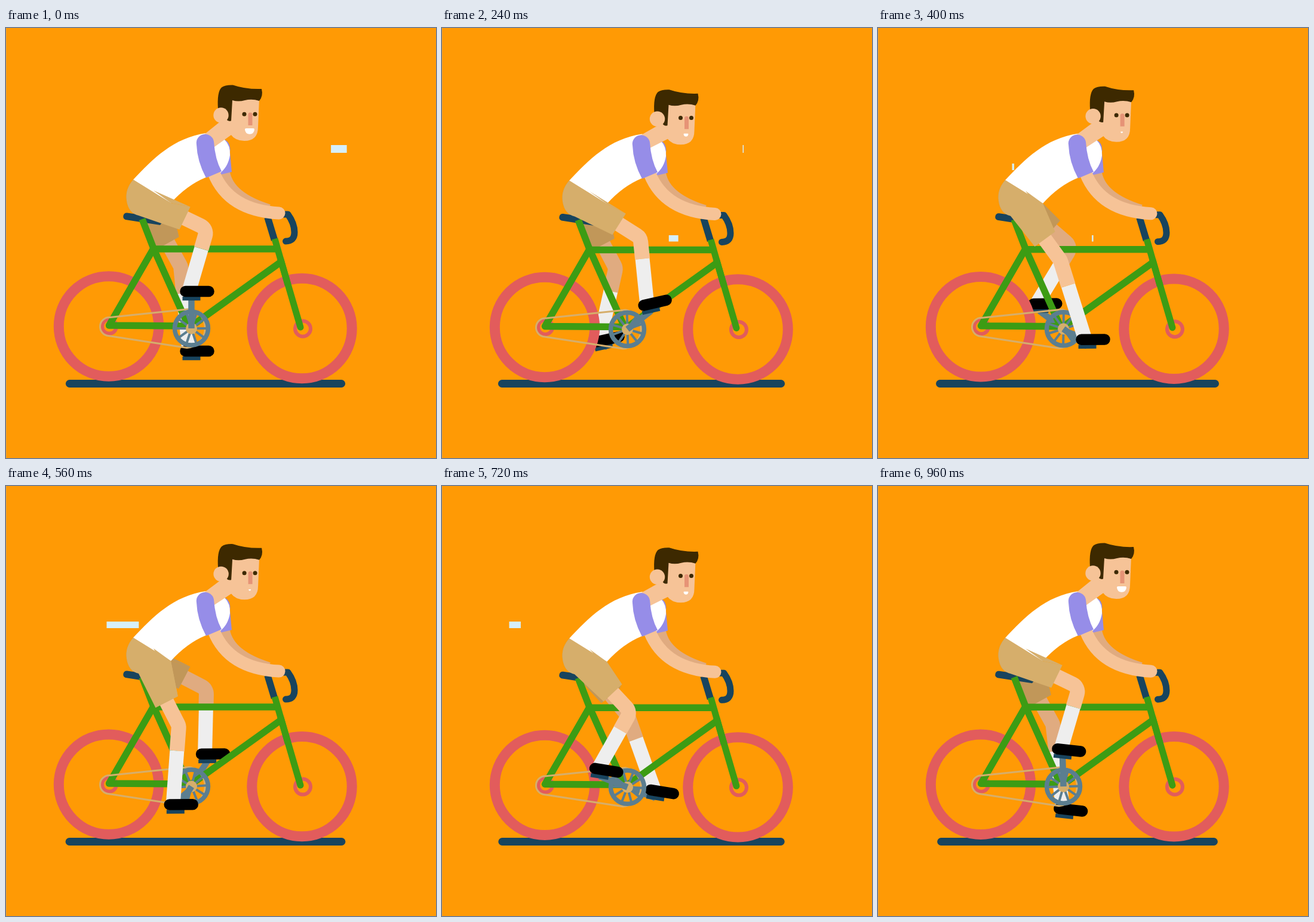
Recreate the animation shown at these times as an HTML page with a canvas. Size 720 by 720 pixels, loop 1000 ms.

```html
<!DOCTYPE html>
<html lang="en">
<head>
<meta charset="utf-8">
<title>Cyclist</title>
<style>
html, body { margin: 0; width: 100%; height: 100%; overflow: hidden; background: #ff9a05; }
canvas { display: block; width: 720px; height: 720px; }
</style>
</head>
<body>
<canvas id="stage" width="720" height="720"></canvas>
<script>
const g = document.getElementById('stage').getContext('2d');
const LOOP = 1000, STEP = 40, TAU = Math.PI * 2, RAD = Math.PI / 180;
const HUB = [310.5, 503], CRANK = 50, HIP = [230, 285];
const C = {
  bg: '#ff9a05', navy: '#18445e', red: '#e25c5c', green: '#3c9c14', steel: '#5b7e90',
  tan: '#d6ae6b', tanDark: '#c19759', skin: '#f6c397', skinDark: '#e0ab80',
  sock: '#eeeeee', purple: '#968de8', hair: '#3d2900', nose: '#e69376', dash: '#d6effb'
};

const sin = deg => Math.sin(deg * RAD);
const cos = deg => Math.cos(deg * RAD);
const clamp = v => Math.max(0, Math.min(1, v));
const mix = (a, b, k) => a + (b - a) * k;
const wave = (t, period) => Math.sin(Math.PI * t / period) ** 2;

function fill(path, color) {
  g.fillStyle = color;
  g.fill(new Path2D(path));
}

function line(path, color, width, cap = 'butt') {
  g.strokeStyle = color;
  g.lineWidth = width;
  g.lineCap = cap;
  g.lineJoin = 'round';
  g.stroke(new Path2D(path));
}

function disc(x, y, r, color, ry = r) {
  g.fillStyle = color;
  g.beginPath();
  g.ellipse(x, y, r, ry, 0, 0, TAU);
  g.fill();
}

function ring(x, y, r, color, width) {
  g.strokeStyle = color;
  g.lineWidth = width;
  g.beginPath();
  g.arc(x, y, r, 0, TAU);
  g.stroke();
}

function shifted(dx, dy, draw) {
  g.save();
  g.translate(dx, dy);
  draw();
  g.restore();
}

const pedalAt = deg => [HUB[0] + CRANK * sin(deg), HUB[1] - CRANK * cos(deg)];

function crankArm(deg) {
  line(`M${HUB} L${pedalAt(deg)}`, C.steel, 10.5);
}

// The thigh swings with the crank; the shin joins knee and pedal.
function leg(deg, tilt, skin, cloth) {
  const thigh = 46.5 - 18.5 * cos(deg - 16) - 3 * cos(2 * deg);
  const ux = cos(thigh), uy = sin(thigh);
  const along = (d, side = 0) => [HIP[0] + ux * d + uy * side, HIP[1] + uy * d - ux * side];
  const [px, py] = pedalAt(deg);
  const c = cos(tilt), s = sin(tilt);
  const foot = (x, y) => [px + x * c - y * s, py + x * s + y * c];

  const hem = 71 + thigh * .24;
  const knee = along(110 + thigh * .33);
  const ankle = foot(-4, -13);
  const sock = knee.map((v, i) => mix(v, ankle[i], .32));

  line(`M${foot(-15, 0)} L${foot(15, 0)}`, C.navy, 6.5);

  g.strokeStyle = skin;
  g.lineWidth = 25;
  g.lineCap = 'butt';
  g.lineJoin = 'round';
  g.beginPath();
  g.moveTo(...along(hem - 20));
  g.arcTo(...knee, ...sock, 14);
  g.lineTo(...sock);
  g.stroke();

  line(`M${sock} L${ankle}`, C.sock, 24);
  line(`M${foot(-10, -12)} L${foot(29, -12)}`, '#000', 18.5, 'round');

  const high = along(hem, 21), low = along(hem, -21);
  fill(`M213,254 L276,293 L${high} L${low} L222,314 Q205,310 202,289 Q199,270 213,254 Z`, cloth);
  fill(`M247,272 L${high} L276,293 Z`, cloth);
}

// A streak runs left; its tail sets off later and catches up at the end.
function streak(t, y, h, from, to, start) {
  const end = start + 420, lag = 160;
  if (t < start || t >= end) return;
  const x = s => mix(from, to, clamp((t - s) / (end - s)));
  const left = x(start);
  g.fillStyle = C.dash;
  g.fillRect(left, y, x(start + lag) - left, h);
}

function bike(deg) {
  ring(172, 499.5, 83.7, C.red, 17);
  ring(495.5, 503, 83.7, C.red, 17);
  ring(173, 499.5, 12, C.red, 6);
  ring(497, 503.5, 13, C.red, 6);

  line('M438,317 L449.5,355', C.navy, 11.5);
  line('M462,312 H472 Q483,327 483,342 Q483,357 468.5,357', C.navy, 11, 'round');
  fill('M203,309.5 L240,315 Q257,320 262,325 L258,330 L200,321 A6,6 0 0 1 203,309.5 Z', C.navy);

  line('M228,320 L247,369 L305,498', C.green, 11.5);
  line('M247,370 H454', C.green, 11.5);
  line('M247,369 L172.5,498 L306,499', C.green, 11.5, 'round');
  line('M460,392 L312,498', C.green, 11.5);
  line('M450,353 L472,430', C.green, 11);
  line('M460,388 L493,501', C.green, 11, 'round');

  line('M308,470.5 L174,484.5 A15.5,15.5 0 0 0 172,515.5 L303,535.5 A33,33 0 0 0 308,470.5', C.tan, 3);
  for (let i = 0; i < 10; i++) {
    const a = deg + i * 36;
    line(`M${HUB} l${[27 * cos(a), 27 * sin(a)]}`, C.steel, 4);
  }
  ring(...HUB, 28, C.steel, 7.5);
  disc(...HUB, 9.5, C.tan);
  crankArm(deg);
}

function head(nod, blink, smile) {
  fill('M377,116 L424,118 L422,166 Q422,189 399,189 Q384,189 376,178 L368,160 Z', C.skin);
  shifted(0, nod * .25, () =>
    fill('M355,136 Q353,107 361,99.5 Q367,95 380,95.5 Q402,103 428,102 Q431,114 424,122 ' +
         'Q412,118 400,121 Q389,124 379,121 L377,155.5 Q372,157 369,153 L360,134 Z', C.hair));
  disc(360, 146, 12.7, C.skin);
  for (const x of [399, 417]) disc(x, 144.3, 3.5, C.hair, 3.5 * blink);
  fill('M405.5,163 V145 A3.5,3.5 0 0 1 412.5,145 V163 Z', C.nose);
  g.save();
  g.translate(408, 173);
  g.scale(smile, smile);
  fill('M-6,-5 H6 Q8,-5 8,-3 Q7,4.8 0,4.8 Q-7,4.8 -8,-3 Q-8,-5 -6,-5 Z', '#fff');
  g.restore();
}

function torso(nod) {
  fill('M366,187 Q377,192 375,208 L378,241 L357,246 Z', C.purple);
  fill('M213,254 C246,219 280,184 335,176 L366,187 Q376,197 375,213 Q372,233 357,244 ' +
       'L335,250 Q303,263 276,293 Z', '#fff');
  fill(`M331,179 L357,${158 + nod} L373,${152 + nod} L380,${177 + nod} L349,199 Z`, C.skin);
}

function nearArm() {
  line('M348,243 C365,285 402,307 457,310', C.skin, 21, 'round');
  fill('M319,195 A14.6,14.6 0 0 1 348,190 Q350,220 361,240 L335,251 Q320,223 319,195 Z', C.purple);
}

function draw(t) {
  const k = t / LOOP;
  const deg = 360 * k * k * (3 - 2 * k);
  const bob = wave(t - 20, 500);
  const lift = 1.5 * bob;
  const nod = 6.3 * wave(t, 486);
  const tilt = -12 * sin(360 * k) - 7 * sin(720 * k);
  const blink = Math.max(.22, clamp(Math.abs(t - 160) / 80));
  const smile = .17 + .83 * (Math.abs(k - .48) / .48) ** 1.35;

  g.fillStyle = C.bg;
  g.fillRect(0, 0, 720, 720);
  g.fillStyle = '#eda236';
  g.fillRect(0, 0, 1, 720);

  streak(t, 196, 13, 572, 501, -165);
  streak(t, 347, 10.5, 411, 354, 10);
  streak(t, 227, 11, 228, 81, 390);
  line(`M${106.5 - 6.3 * bob},595.5 H${561.5 + 6.3 * bob}`, C.navy, 13, 'round');

  shifted(0, lift, () => {
    crankArm(deg + 180);
    leg(deg + 180, tilt, C.skinDark, C.tanDark);
    bike(deg);
    line('M366,242 Q373,283 440,304', C.skinDark, 18);
    torso(nod);
    leg(deg, tilt, C.skin, C.tan);
  });
  shifted(nod * .08, nod, () => head(nod, blink, smile));
  shifted(0, lift, nearArm);
}

function tick() {
  const t = performance.now() % LOOP;
  draw(Math.floor(t / STEP) * STEP);
  requestAnimationFrame(tick);
}
tick();
</script>
</body>
</html>
```
